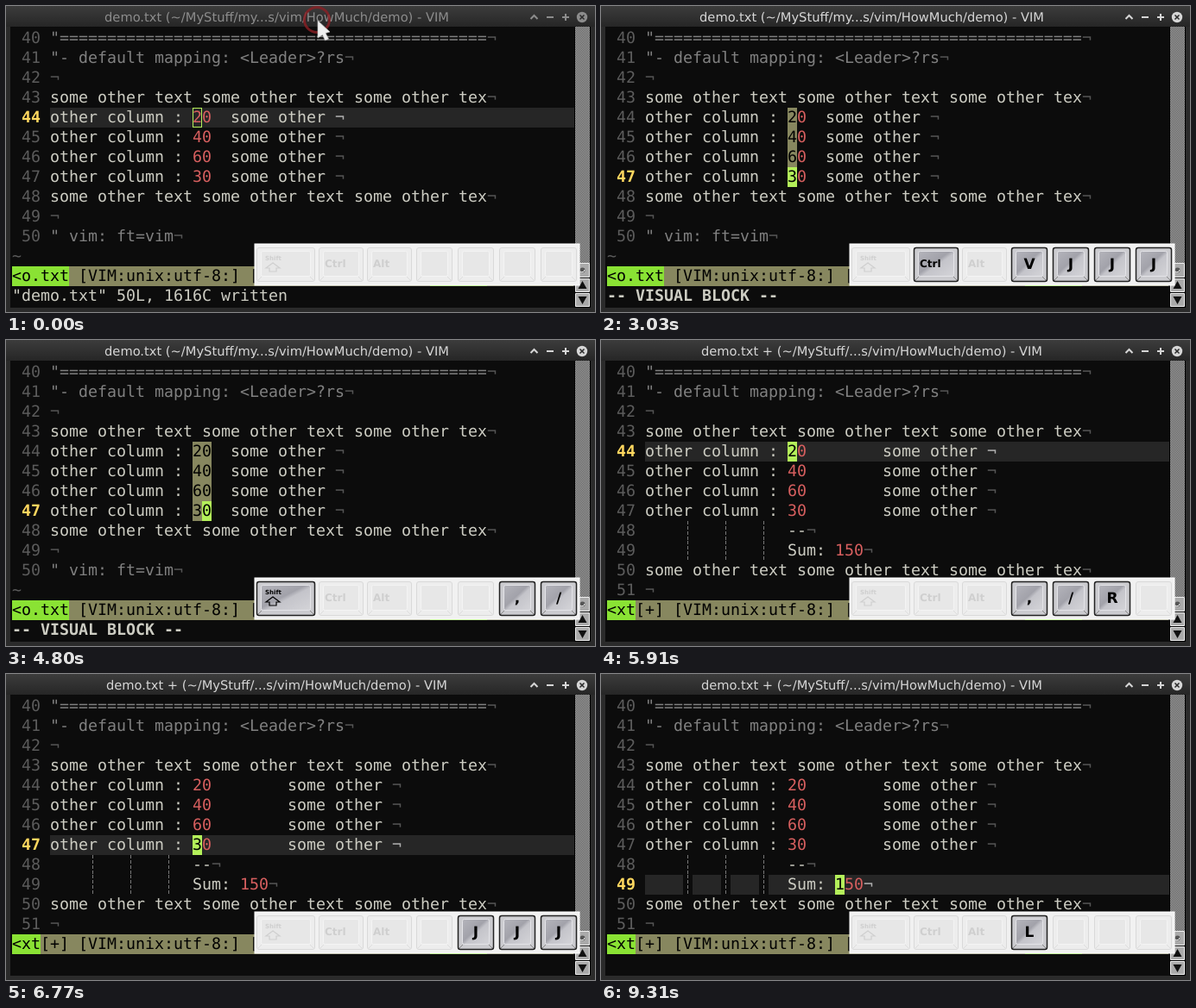
Recreate the animation shown at these times as an HTML page. Size 682 px wide and 355 px high, loop 9.6 s.

```html
<!DOCTYPE html>
<html lang="en">
<head>
<meta charset="utf-8">
<title>Vim column sum</title>
<style>
html, body { margin: 0; width: 100%; height: 100%; overflow: hidden; background: #0c0c0c; }
svg { display: block; width: 682px; height: 355px; }
text { white-space: pre; text-rendering: geometricPrecision; }
.mono { font: 18.27px "DejaVu Sans Mono", monospace; }
.sans { font: 14.67px "DejaVu Sans", sans-serif; }
.cap { font-family: "DejaVu Sans", sans-serif; font-weight: bold; }
.b { font-weight: bold; }
</style>
</head>
<body>
<svg viewBox="0 0 682 355" xmlns="http://www.w3.org/2000/svg">
  <defs>
    <linearGradient id="bar" x2="0" y2="1">
      <stop offset="0" stop-color="#3c3c3c"/><stop offset="1" stop-color="#262626"/>
    </linearGradient>
    <linearGradient id="face" x2="1" y2="1">
      <stop offset="0" stop-color="#b4b4bb"/><stop offset=".45" stop-color="#a2a2aa"/>
      <stop offset=".55" stop-color="#c4c4ca"/><stop offset="1" stop-color="#d4d4d8"/>
    </linearGradient>
    <pattern id="dots" width="2" height="2" patternUnits="userSpaceOnUse">
      <rect width="2" height="2" fill="#555"/>
      <path d="M0 0h1v1h1v1h-1v-1h-1z" fill="#aaa"/>
    </pattern>
  </defs>
  <rect width="682" height="355" fill="#2b2b2b"/>
  <rect width="682" height="24" fill="url(#bar)"/>
  <rect x="5" y="24" width="672" height="326" fill="#0c0c0c"/>
  <g id="title"></g>
  <g id="screen"></g>
  <g id="scroll">
    <rect x="658" y="24" width="19" height="326" fill="#000"/>
    <rect x="659" y="24" width="17" height="274" fill="url(#dots)"/>
    <g fill="#aaa" stroke="#eee">
      <path d="M659.5 298.5h16v16h-16zM659.5 316.5h16v15h-16zM659.5 333.5h16v15h-16z"/>
    </g>
    <circle cx="667.5" cy="306.5" r="3" fill="#555"/>
    <path d="M665 308a3 3 0 0 0 5 -2" fill="none" stroke="#fff"/>
    <path d="M667.5 319l5 9h-10zM667.5 346l5-9h-10z" fill="#111"/>
  </g>
  <g id="keys"></g>
  <g id="mouse"></g>
</svg>
<script>
const LOOP = 9600, X0 = 7, Y0 = 26, CW = 11, RH = 23, TEXT = 4;
const C = {
  text: '#cdcdc3', note: '#808080', num: '#5c5c5c', eol: '#555', eolHot: '#b0b0b0',
  red: '#d75f5f', here: '#ffd75f', row: '#262626', olive: '#87875f',
  green: '#8ae234', cursor: '#b4f05a', black: '#000'
};

// Each entry: time and the state it changes.
const events = [
  [0, { focus: 0, ring: 1, mouse: [361, 17], line: 44, col: 15, visual: 0, sum: 0, hot: 1,
        named: 0, msg: '"demo.txt" 50L, 1616C written', ctrl: 0, shift: 0, keys: '    ' }],
  [130, { focus: 1 }],
  [170, { ring: 0 }],
  [480, { mouse: [378, 8] }],
  [520, { mouse: null }],
  [1790, { ctrl: 1 }],
  [2200, { keys: '   V' }],
  [2250, { visual: 1, msg: '-- VISUAL BLOCK --' }],
  [2700, { keys: '  VJ' }],
  [2740, { line: 45 }],
  [2850, { keys: ' VJJ' }],
  [2890, { line: 46 }],
  [2990, { keys: 'VJJJ' }],
  [3030, { line: 47 }],
  [3330, { keys: 'JJJL' }],
  [3380, { col: 16 }],
  [3990, { keys: 'JJJ ' }],
  [4120, { keys: 'JJ  ', ctrl: 0 }],
  [4260, { keys: '    ' }],
  [4400, { keys: '   ,' }],
  [4710, { shift: 1 }],
  [4760, { keys: '   /' }],
  [4800, { keys: '  ,/' }],
  [5160, { keys: ' ,/R' }],
  [5420, { keys: ',/RS' }],
  [5500, { visual: 0, sum: 1, line: 44, col: 15, msg: '' }],
  [5540, { named: 1 }],
  [5910, { keys: ',/R ', shift: 0 }],
  [6220, { keys: '    ' }],
  [6420, { keys: '   J' }],
  [6460, { line: 45 }],
  [6590, { keys: '  JJ', line: 46 }],
  [6730, { keys: ' JJJ' }],
  [6770, { line: 47 }],
  [6910, { keys: 'JJJJ' }],
  [6950, { line: 48 }],
  [7110, { keys: 'JJJJ' }],
  [7150, { hot: 0 }],
  [7350, { hot: 1, line: 49 }],
  [7500, { keys: 'JJJL', col: 16 }],
  [7630, { keys: 'JJLL', col: 17 }],
  [7760, { keys: 'JLLL', col: 18 }],
  [7920, { keys: 'LLLL' }],
  [7960, { col: 19 }],
  [8170, { keys: 'LLLL' }],
  [8210, { col: 20 }],
  [8760, { keys: 'LLL ' }],
  [8950, { keys: 'LL  ' }],
  [9310, { keys: 'L   ' }]
];

const $ = id => document.getElementById(id);
const esc = s => s.replace(/&/g, '&amp;').replace(/</g, '&lt;');
const rect = (x, y, w, h, fill, more = '') =>
  `<rect x="${x}" y="${y}" width="${w}" height="${h}" fill="${fill}" ${more}/>`;
const label = (x, y, s, fill, cls, more = '') =>
  `<text x="${x}" y="${y}" fill="${fill}" class="${cls}" ${more}>${esc(s)}</text>`;
const px = col => X0 + col * CW;
const py = row => Y0 + row * RH;
const cells = (col, row, n, fill) => rect(px(col), py(row), n * CW, RH, fill);
// Places every word on its own column of the grid.
const put = (col, row, s, fill, bold) => [...s.matchAll(/\S+/g)].map(m =>
  label(px(col + m.index), py(row) + 17, m[0], fill, bold ? 'mono b' : 'mono')).join('');

function bufferLines(sum) {
  const row = n => 'other column : ' + n + ' '.repeat(sum ? 8 : 2) + 'some other ';
  const some = 'some other text some other text some other tex';
  const pad = ' '.repeat(15);
  return [
    '"' + '='.repeat(45), '"- default mapping: <Leader>?rs', '', some,
    ...[20, 40, 60, 30].map(row),
    ...(sum ? [pad + '--', pad + 'Sum: 150', some, ''] : [some, '', '" vim: ft=vim'])
  ];
}

function drawLine(s, text, row) {
  const n = 40 + row, here = n === s.line && s.hot;
  const lit = here && !s.visual;
  const guides = s.sum && (n === 48 || n === 49) ? [4, 8, 12] : [];
  let out = lit ? rect(px(TEXT), py(row), 607, RH, C.row) : '';
  out += put(1, row, String(n), here ? C.here : C.num, here);
  for (const g of guides) {
    const x = px(TEXT + g) + 5.5;
    if (lit) out += cells(TEXT + g, row, 1, '#0c0c0c');
    out += `<path d="M${x} ${py(row)}v${RH}" stroke="#777" stroke-dasharray="4 2"/>`;
  }
  const num = text.match(/\d+/);
  if (num) {
    const at = num.index, end = at + num[0].length;
    out += put(TEXT, row, text.slice(0, at), C.text) + put(TEXT + at, row, num[0], C.red) +
           put(TEXT + end, row, text.slice(end), C.text);
  } else {
    out += put(TEXT, row, text, text[0] === '"' ? C.note : C.text);
  }
  out += put(TEXT + text.length, row, '¬', lit ? C.eolHot : C.eol);

  const mark = (col, fill) => cells(TEXT + col, row, 1, fill) +
    put(TEXT + col, row, text[col] || ' ', C.black);
  if (s.visual && n >= 44 && n <= s.line)
    for (let c = 15; c <= s.col; c++) out += mark(c, C.olive);
  if (here) out += s.focus ? mark(s.col, C.cursor) :
    rect(px(TEXT + s.col) + .5, py(row) + .5, CW - 1, RH - 1, 'none', `stroke="${C.cursor}"`);
  return out;
}

function drawScreen(s) {
  const name = s.named ? '<xt' : '<o.txt', n = name.length;
  const rest = (s.named ? '[+]' : '') + ' [VIM:unix:utf-8:] [';
  return bufferLines(s.sum).map((t, i) => drawLine(s, t, i)).join('') +
    (s.sum ? '' : put(0, 11, '~', C.num)) +
    rect(X0, py(12), 650, RH, C.olive) + cells(0, 12, n, C.green) + cells(44, 12, 6, C.green) +
    put(0, 12, name, C.black) + put(n, 12, rest, C.black) +
    put(0, 13, s.msg, C.text, s.visual);
}

function drawTitle(s) {
  const ink = s.focus ? '#d6d6d6' : '#8c8c8c';
  const path = s.named ? 'demo.txt + (~/MyStuff/...s' : 'demo.txt (~/MyStuff/my...s';
  return label(313.5, 18, path + '/vim/HowMuch/demo) - VIM', ink, 'sans', 'text-anchor="middle"') +
    `<g fill="none" stroke="${ink}" stroke-width="2">
      <path d="M607.5 15l4-4 4 4M626 13h8M644 13h8M648 9v8"/>
      <circle cx="667" cy="13" r="6.2" fill="${ink}" stroke="none"/>
      <path d="M664.5 10.500l5 5m0-5l-5 5" stroke="#2c2c2c" stroke-width="1.6"/></g>`;
}

function cap(x, w, on) {
  const edge = on ? '#222' : '#d9d9d9';
  return rect(x + .5, 280.5, w - 1, 39, on ? '#cbcbcf' : '#ededed', `rx="2.5" stroke="${edge}" stroke-width="${on ? 1.5 : 1}"`) +
    rect(x + 5.5, 284.5, w - 11, 29, on ? 'url(#face)' : '#e7e7e7', `rx="2" stroke="${on ? '#e4e4e8' : '#f4f4f4'}"`) +
    `<path d="M${x + 2} 318l4-4M${x + w - 2} 318l-4-4" stroke="${on ? '#888' : '#ddd'}"/>`;
}

function drawKeys(s) {
  const ink = on => on ? '#000' : '#cfcfcf';
  const word = (x, y, t, size, on) => label(x, y, t, ink(on), 'cap', `font-size="${size}"`);
  let out = rect(288, 276, 376, 48, '#f1f1f1', 'stroke="#fff"') +
    cap(290, 68, s.shift) + word(300, 295, 'Shift', 7, s.shift) +
    `<path d="M309 298l8 6h-4v4h-8v-4h-4z" fill="none" stroke="${ink(s.shift)}" stroke-width="1.2"/>` +
    cap(362, 52, s.ctrl) + word(369, 303, 'Ctrl', 12, s.ctrl) +
    cap(418, 52, 0) + word(425, 303, 'Alt', 12, 0);
  [...s.keys].forEach((k, i) => {
    const x = 475 + 48 * i, on = k !== ' ';
    out += cap(x, 42, on);
    if (on) out += label(x + 21, 305, k, '#000', 'cap', 'font-size="17" text-anchor="middle"');
  });
  return out;
}

function drawMouse(s) {
  if (!s.mouse) return '';
  const ring = s.ring ? '<circle cx="360" cy="16" r="14.500" fill="none" stroke="#8c1f24" stroke-width="3" opacity=".8"/>' : '';
  return ring + `<path transform="translate(${s.mouse})" d="M0 0L14 13L9 14.500L12.500 21L8.500 23L5.500 16.500L0 20z"
    fill="#efefef" stroke="#bbb" stroke-width=".7"/>`;
}

let shown = 0;
const start = performance.now();
function tick() {
  const t = (performance.now() - start) % LOOP;
  const past = events.filter(e => e[0] <= t);
  if (past.length !== shown) {
    shown = past.length;
    const s = Object.assign({}, ...past.map(e => e[1]));
    $('title').innerHTML = drawTitle(s);
    $('screen').innerHTML = drawScreen(s);
    $('keys').innerHTML = drawKeys(s);
    $('mouse').innerHTML = drawMouse(s);
  }
  requestAnimationFrame(tick);
}
tick();
</script>
</body>
</html>
```
